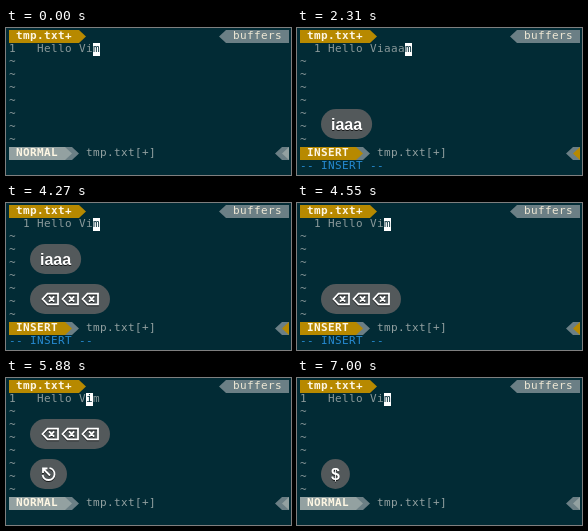
An HTML page that plays this animation: 285 px wide and 147 px high, repeating every 8000 ms.

```html
<!DOCTYPE html>
<html lang="en">
<head>
<meta charset="utf-8">
<title>Vim insert mode</title>
<style>
  html, body { margin: 0; width: 100%; height: 100%; overflow: hidden; background: #022b35; }
  svg { display: block; width: 100vw; height: 100vh; }
  .cell { font: 11px "DejaVu Sans Mono", Menlo, monospace; letter-spacing: .378px; white-space: pre; }
  .bold { font-weight: bold; }
  .key { font: bold 16px "Liberation Sans", Arial, sans-serif; fill: #fff; }
  .glyph { fill: none; stroke: #fff; stroke-width: 1.8; }
  .keys { filter: drop-shadow(.5px 1px .7px rgba(0, 0, 0, .7)); }
</style>
</head>
<body>
<svg id="stage" viewBox="0 0 285 147"></svg>
<script>
const LOOP = 8000, STEP = 70;
const COL = 7, ROW = 13, LEFT = 3, TOP = 2;
const C = {
  back: '#022b35', gold: '#b78900', gray: '#6b7f85', pale: '#93a1a1',
  text: '#8a999a', cream: '#fdf6e3', blue: '#268bd2', bubble: '#53595b'
};
const stage = document.getElementById('stage');

const colX = col => LEFT + col * COL;
const rowY = row => TOP + row * ROW;

const write = (col, row, text, fill, cls = '') =>
  `<text class="cell ${cls}" x="${colX(col)}" y="${rowY(row) + 9}" fill="${fill}">${text}</text>`;

const block = (col, row, cols, fill) =>
  `<rect x="${colX(col)}" y="${rowY(row)}" width="${cols * COL}" height="${ROW}" fill="${fill}"/>`;

// Powerline separator filling one cell, pointing right (1) or left (-1)
const arrow = (col, row, dir, fill) => {
  const base = colX(dir > 0 ? col : col + 1);
  return `<path d="M${base} ${rowY(row)}l${dir * COL} ${ROW / 2}l${-dir * COL} ${ROW / 2}z" fill="${fill}"/>`;
};

// Value of the last [time, value] entry that has been reached
const at = (track, t) => track.reduce((value, [time, next]) => t >= time ? next : value, track[0][1]);

const extraLetters = [[0, 0], [1680, 1], [2030, 2], [2310, 3], [3920, 2], [4130, 1], [4270, 0]];

const bubbles = [
  { keys: [[1120, 'i'], [1610, 'ia'], [2030, 'iaa'], [2240, 'iaaa']], raise: 3850, fade: 4340, steps: 4 },
  { keys: [[3920, '⌫'], [4060, '⌫⌫'], [4270, '⌫⌫⌫']], raise: 4760, fade: 6370, steps: 4 },
  { keys: [[4830, '⎋']], raise: LOOP, fade: 6860, steps: 3 },
  { keys: [[7000, '$']], raise: LOOP, fade: LOOP, steps: 1 }
];

const advance = { i: 4.45, a: 8.9, $: 8.9, '⌫': 20, '⎋': 17 };
const glyphs = {
  '⌫': 'M2.5 0l5 -5.3h10.5v10.6h-10.5zM9 -2.6l5.2 5.2m0 -5.2l-5.2 5.2',
  '⎋': 'M9.5 -5.9A6 6 0 1 1 2.6 1M10 1.5L3 -5.5M3 -1V-5.5H7.5'
};

function drawKeys(keys, x, y) {
  let out = '';
  for (const key of keys) {
    out += glyphs[key]
      ? `<path class="glyph" transform="translate(${x} ${y})" d="${glyphs[key]}"/>`
      : `<text class="key" x="${x}" y="${y + 6}">${key}</text>`;
    x += advance[key];
  }
  return out;
}

function drawBubble({ keys, raise, fade, steps }, t) {
  const faded = t < fade ? 0 : (Math.floor((t - fade) / STEP) + 1) / steps;
  if (t < keys[0][0] || faded >= 1) return '';
  const label = at(keys, t);
  const width = 20 + [...label].reduce((sum, key) => sum + advance[key], 0);
  const y = t >= raise ? 41 : 81;
  return `<g opacity="${1 - faded}">
    <rect x="24" y="${y}" width="${width}" height="30" rx="15" fill="${C.bubble}"/>
    <g class="keys">${drawKeys(label, 34, y + 15)}</g></g>`;
}

function drawTabline() {
  return block(0, 0, 10, C.gold) + arrow(10, 0, 1, C.gold) + write(1, 0, 'tmp.txt+', C.cream, 'bold') +
    arrow(30, 0, -1, C.gray) + block(31, 0, 9, C.gray) + write(32, 0, 'buffers', '#eee8d5');
}

function drawBuffer(t, insert) {
  const extra = at(extraLetters, t);
  const line = 'Hello Vi' + 'a'.repeat(extra) + 'm';
  const cursor = t >= 4830 && t < 7000 ? 7 : 8 + extra;
  let out = write(insert ? 2 : 0, 1, '1', C.text) + write(4, 1, line.slice(0, cursor), C.text) +
    write(5 + cursor, 1, line.slice(cursor + 1), C.text) +
    block(4 + cursor, 1, 1, '#fff') + write(4 + cursor, 1, line[cursor], C.back);
  for (let row = 2; row < 9; row++) out += write(0, row, '~', C.text);
  return out;
}

function drawStatus(insert) {
  const mode = insert ? C.gold : C.pale;
  return block(0, 9, 8, mode) + block(8, 9, 1, C.gray) + arrow(8, 9, 1, mode) + arrow(9, 9, 1, C.gray) +
    write(1, 9, insert ? 'INSERT' : 'NORMAL', C.cream, 'bold') + write(11, 9, 'tmp.txt[+]', C.pale) +
    arrow(38, 9, -1, C.gray) + block(39, 9, 1, C.gray) + arrow(39, 9, -1, mode);
}

function render(t) {
  const insert = t >= 1120 && t < 5880;
  const message = t >= 1120 && t < 4830 ? write(0, 10, '-- INSERT --', C.blue) : '';
  return `<rect width="285" height="147" fill="${C.back}"/>` + drawTabline() + drawBuffer(t, insert) +
    drawStatus(insert) + message + bubbles.map(b => drawBubble(b, t)).join('');
}

let shown = '';
function tick() {
  const markup = render(performance.now() % LOOP);
  if (markup !== shown) stage.innerHTML = shown = markup;
  requestAnimationFrame(tick);
}
tick();
</script>
</body>
</html>
```
